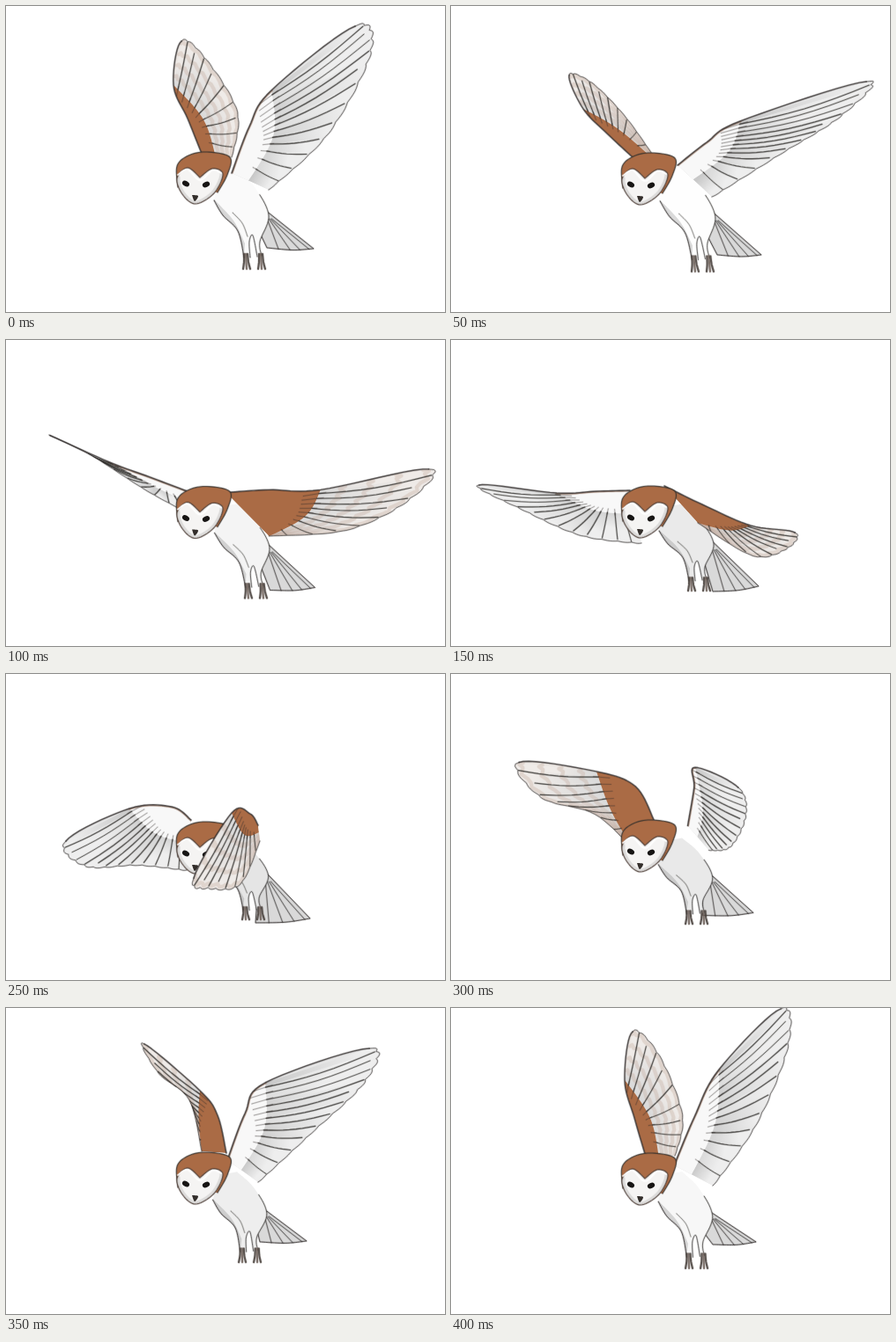
An HTML page with a canvas that plays this animation: 498x348 px, repeating every 450 ms.

```html
<!DOCTYPE html>
<html lang="en">
<head>
<meta charset="utf-8">
<title>Flying owl</title>
<style>
html, body { margin: 0; width: 100%; height: 100%; overflow: hidden; background: #fff; }
canvas { display: block; width: 498px; height: 348px; }
</style>
</head>
<body>
<canvas id="stage" width="498" height="348"></canvas>
<script>
const ctx = document.getElementById('stage').getContext('2d');
const STEP = 50;
const INK = '#302d2b', BROWN = '#aa6b45';

const mix = (a, b, k) => a + (b - a) * k;
const blend = (p, q, k) => p.map((v, i) => mix(v, q[i], k));
const grey = v => `rgb(${v},${v},${v})`;

function pairs(flat) {
  const out = [];
  for (let i = 0; i < flat.length; i += 2) out.push([flat[i], flat[i + 1]]);
  return out;
}

function seeded(seed) {
  return () => (seed = (seed * 16807) % 2147483647) / 2147483647;
}

// Catmull-Rom curve through key points.
function smooth(p) {
  const out = [], last = p.length - 1;
  for (let i = 0; i < last; i++) {
    const a = p[Math.max(i - 1, 0)], b = p[i], c = p[i + 1], d = p[Math.min(i + 2, last)];
    for (let s = 0; s < 10; s++) {
      const t = s / 10;
      out.push(b.map((v, k) => 0.5 * (2 * v + (c[k] - a[k]) * t +
        (2 * a[k] - 5 * v + 4 * c[k] - d[k]) * t * t + (3 * v - a[k] - 3 * c[k] + d[k]) * t ** 3)));
    }
  }
  return [...out, p[last]];
}

const curve = (...flat) => smooth(pairs(flat));

function along(line, u) {
  const x = u * (line.length - 1), i = Math.min(Math.floor(x), line.length - 2);
  return blend(line[i], line[i + 1], x - i);
}

const sample = (n, f) => Array.from({ length: n + 1 }, (_, i) => f(i / n));

function trace(points) {
  ctx.beginPath();
  points.forEach(([x, y]) => ctx.lineTo(x, y));
}

function fill(points, colour) {
  trace(points);
  ctx.fillStyle = colour;
  ctx.fill();
}

// Pencil line: a core with a softer edge.
function pen(points, width = 1, alpha = 0.8, colour = INK) {
  trace(points);
  ctx.strokeStyle = colour;
  for (const [w, a] of [[width, alpha], [width + 1.3, alpha * 0.25]]) {
    ctx.lineWidth = w;
    ctx.globalAlpha = a;
    ctx.stroke();
  }
  ctx.globalAlpha = 1;
}

// Keys: shoulder, forearm, wrist, tip, outer trail, inner trail, trailing root.
function drawWing({ keys, back, depth = 0.45 }) {
  const points = pairs(keys);
  const [shoulder, , wrist, , , inner, root] = points;
  const n = back ? 10 : 13, random = seeded(n * 97);
  const rim = smooth(points), lead = rim.slice(0, 31), arm = rim.slice(0, 21), trail = rim.slice(30);

  // Feathers fan from the edge of the coverts to the trailing edge.
  const end = blend(shoulder, root, depth);
  const roots = sample(20, u => {
    const k = u ** 1.3;
    return blend(blend(wrist, end, k), inner, 0.8 * k * (1 - k));
  });
  const vane = (u, k) => blend(along(roots, u), along(trail, u), k);
  const scallop = sample(n * 6, u => vane(u, 1 + 0.025 * Math.abs(Math.sin(Math.PI * n * u))));
  const outline = [...lead, ...scallop];

  ctx.save();
  fill(outline, back ? '#ebe6e2' : '#e6e6e6');
  trace(outline);
  ctx.clip();
  for (let i = 0; i < n; i++) {
    const u = i / n, v = (i + 1) / n;
    const shade = ctx.createLinearGradient(...vane(u, 0), ...vane(u, 1));
    const tone = back ? 218 : mix(200, 226, random());
    shade.addColorStop(0, grey(tone));
    shade.addColorStop(mix(0.5, 1, random()), back ? '#efebe8' : '#eeeeee');
    fill([vane(u, 0), vane(u, 1.1), vane(v, 1.1), vane(v, 0)], shade);
  }
  if (back) {
    for (let k = 0.2; k < 1; k += 0.25) pen(sample(30, u => vane(u, k + 0.03 * Math.sin(u * n * 6))), 4, 0.28, '#bda596');
  }
  fill([...arm, ...roots], back ? BROWN : '#f8f8f8');
  if (!back) pen(arm, 3, 0.7, '#a48470');

  for (let i = 1; i < n; i++) {
    const u = i / n, reach = mix(0.88, 0.99, random());
    const sag = Math.hypot(...blend(vane(u, 0), vane(u, 1), 1).map((v, k) => v - vane(u, 0)[k])) * 0.03;
    pen(sample(8, s => {
      const [x, y] = vane(u, s * reach);
      return [x, y + sag * Math.sin(Math.PI * s)];
    }), mix(0.8, 1.3, random()), 0.72);
    pen([vane(u, -0.14), vane(u, 0.06)], 0.8, 0.4);
  }
  ctx.restore();
  pen(scallop, 0.9, 0.6);
  pen(lead, 1.4, 0.75);
}

function drawBody({ legs: [dx, dy], tail: [tx, ty, bx, by] }) {
  // The lower body swings with the legs.
  const hang = (...flat) => curve(...flat).map(([x, y]) => {
    const k = (y - 190) / 110;
    return [x + dx * k, y + dy * k];
  });
  const [rx, ry] = hang(294, 232, 294, 232)[0];
  const fan = curve(tx, ty, mix(tx, bx, 0.45), mix(ty, by, 0.45) + 2, bx, by);
  const tail = [[rx, ry], ...fan, [rx - 8, ry + 22]];
  fill(tail, '#d9d9d9');
  for (let u = 0.15; u < 0.9; u += 0.2) {
    pen([blend([rx, ry + 4], along(fan, u), 0.15), along(fan, u)], 0.9, 0.65);
  }
  pen(tail, 1, 0.75);

  const left = hang(236, 221, 246, 238, 263, 256, 270, 286);
  const right = hang(290, 284, 288, 268, 298, 238, 282, 206, 262, 186);
  const gap = hang(277, 286, 276, 268, 280, 261, 285, 285);
  fill([...left, ...gap, ...right, [242, 190]], grey(mix(250, 229, Math.min(1, -dy / 18))));
  fill([...left, ...hang(271, 270, 258, 244, 237, 221)], 'rgba(110,110,110,.25)');
  pen(left, 1, 0.75);
  pen(right.slice(0, 28), 0.9, 0.7);
  pen(gap, 0.9, 0.7);
  pen(hang(257, 235, 268, 247, 274, 262), 0.8, 0.5);
  for (const x of [270, 287]) {
    for (let toe = 0; toe < 3; toe++) {
      pen(hang(x + toe * 2, 282, x + toe * 2.5, 291, x + toe * 4 - 1, 299), 2.1, 0.85, toe % 2 ? '#6d6058' : '#463f3b');
    }
  }
}

function drawHead(dy) {
  ctx.save();
  ctx.translate(0, dy);
  const cap = curve(195, 206, 194, 182, 207, 170, 228, 166, 254, 172, 251, 192, 240, 212);
  fill(cap, BROWN);
  pen(cap, 1.1, 0.7);
  const face = curve(220, 195, 206, 184, 194, 196, 200, 214, 215, 225, 236, 213, 246, 191, 234, 185, 220, 195);
  fill(face, '#f5f4f3');
  ctx.save();
  trace(face);
  ctx.clip();
  pen(face.slice(20, 62), 7, 0.16, '#777');
  ctx.restore();
  pen(face, 1.1, 0.75, '#4b3d35');
  pen(curve(195, 192, 206, 186, 220, 198, 234, 187, 244, 190), 1.6, 0.9, '#fff');
  for (const [x, y, tilt] of [[204, 202, 0.55], [227, 203, -0.4]]) {
    ctx.fillStyle = '#171514';
    ctx.beginPath();
    ctx.ellipse(x, y, 4.3, 3, tilt, 0, 7);
    ctx.fill();
  }
  fill(curve(211, 215, 218, 216, 214, 222, 211, 215), '#332e2b');
  ctx.restore();
}

const rise = {
  head: 0, legs: [0, 0], tail: [349, 276, 296, 275],
  far: { back: true, keys: [222, 168, 206, 128, 190, 90, 199, 40, 228, 63, 262, 121, 256, 172] },
  near: { keys: [256, 190, 276, 137, 301, 96, 396, 23, 412, 55, 365, 145, 298, 209] }
};
const spread = {
  head: 1, legs: [4, 3], tail: [352, 283, 302, 283],
  far: { back: true, depth: 0.8, keys: [206, 172, 178, 146, 150, 117, 134, 79, 160, 88, 196, 124, 228, 168] },
  near: { keys: [257, 181, 290, 155, 328, 131, 471, 86, 440, 126, 372, 169, 296, 217] }
};
const level = {
  head: 0, legs: [0, -14], tail: [349, 280, 297, 286],
  far: { keys: [203, 171, 165, 172, 120, 174, 32, 165, 80, 192, 148, 222, 216, 231] },
  near: { back: true, depth: 1, keys: [242, 166, 285, 187, 340, 211, 390, 219, 380, 237, 342, 245, 280, 208] }
};
const scoop = {
  head: 2, legs: [-1, -20], tail: [345, 278, 283, 283],
  far: { keys: [210, 166, 188, 151, 140, 153, 68, 190, 92, 218, 150, 217, 205, 223] },
  near: { back: true, keys: [286, 172, 277, 159, 256, 158, 213, 232, 232, 243, 266, 238, 288, 190] }
};
const lift = {
  head: -2, legs: [-5, -10], tail: [341, 265, 288, 266],
  far: { back: true, depth: 1, keys: [250, 165, 240, 122, 220, 94, 157, 41, 174, 75, 208, 105, 222, 163] },
  near: { keys: [251, 173, 271, 120, 294, 85, 412, 46, 405, 85, 345, 143, 286, 198] }
};
const high = {
  head: -1, legs: [-3, -3], tail: [346, 266, 297, 269],
  far: { back: true, keys: [220, 166, 208, 125, 197, 82, 206, 27, 236, 55, 262, 122, 254, 168] },
  near: { keys: [253, 179, 276, 124, 304, 70, 374, 1, 381, 45, 346, 132, 297, 202] }
};

// Midway pose; the wings reach out from the shoulder by the given factor.
function midway(a, b, reach) {
  const wing = (p, q) => {
    const keys = blend(p.keys, q.keys, 0.5);
    return { ...q, keys: keys.map((v, i) => mix(keys[i % 2], v, reach)) };
  };
  return {
    head: mix(a.head, b.head, 0.5),
    legs: blend(a.legs, b.legs, 0.5),
    tail: blend(a.tail, b.tail, 0.5),
    far: wing(a.far, b.far),
    near: wing(a.near, b.near)
  };
}

const poses = [
  rise, spread, midway(spread, level, 1.27), level, midway(level, scoop, 1.05),
  scoop, midway(scoop, lift, 1.3), lift, high
];

function drawPose(p) {
  const folded = p.near.keys[6] < p.near.keys[0];
  ctx.fillStyle = '#fff';
  ctx.fillRect(0, 0, 498, 348);
  drawWing(p.far);
  drawBody(p);
  if (folded) drawHead(p.head);
  drawWing(p.near);
  if (!folded) drawHead(p.head);
}

ctx.lineCap = ctx.lineJoin = 'round';
const start = performance.now();
function frame() {
  const time = performance.now() - start;
  drawPose(poses[Math.floor(time / STEP) % poses.length]);
  requestAnimationFrame(frame);
}
frame();
</script>
</body>
</html>
```
